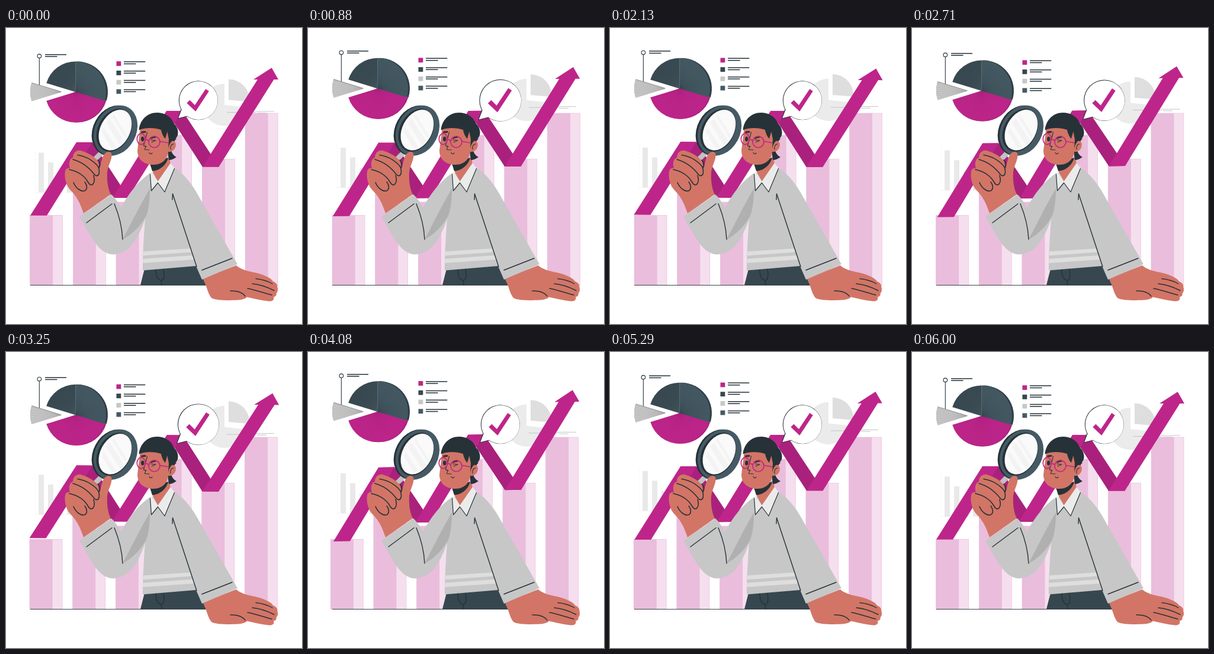
Animation, 500 px wide and 500 px high, one loop 6040 ms. Source, as an HTML page:

```html
<!DOCTYPE html>
<html lang="en">
<head>
<meta charset="utf-8">
<title>Growth analysis</title>
<style>
html, body { margin: 0; width: 100%; height: 100%; overflow: hidden; background: #fff; }
svg { display: block; width: 100vw; height: 100vh; }
.pen { fill: none; stroke: #263238; stroke-width: 1.4; stroke-linecap: round; stroke-linejoin: round; }
.skin { fill: #d27566; }
.hair { fill: #263238; }
.knit { fill: #c7c7c7; }
.pink { fill: #be258a; }
.deep { fill: #a9217c; }
</style>
</head>
<body>
<svg viewBox="0 0 500 500">
  <g id="backdrop">
    <path fill="#ebebeb" d="M369 94V130L404.500 134A35.700 35.700 0 1 1 369 94Z"/>
    <path fill="#dedede" d="M376 86.500A35.500 35.500 0 0 1 411.300 124.500L376 121.500Z"/>
    <path fill="none" stroke="#c4c4c4" stroke-width="1" d="M373 142.500H420L424 141H453M424 143.700H440"/>
    <path fill="none" stroke="#e4e4e4" stroke-dasharray="1 4.500" d="M49.500 205V278"/>
    <path fill="none" stroke="#efefef" stroke-width=".7" d="M49 278H112"/>
    <path fill="#e9e9e9" d="M55 210.500h9V278h-9zM71 227h9V278h-9zM87 245h9V278h-9zM103 238h9V278h-9z"/>
  </g>
  <g id="bars"></g>
  <path stroke="#263238" stroke-width=".9" d="M41 434.500H345"/>
  <g id="arrow">
    <path class="deep" d="M119 193H146L207.500 287H180ZM271 140H298L360 234.500H332Z"/>
    <path class="pink" d="M41 316.700H69L146 193H119ZM180 287H206L298 140H271ZM332 234.500H359.500L452.500 87H460L448.800 67.300L418 87H425Z"/>
  </g>
  <g id="pie">
    <path class="pen" style="stroke-width:1.100" d="M56.300 51V97"/>
    <circle class="pen" cx="56.300" cy="47.400" r="3.300" style="stroke-width:1.100"/>
    <path fill="none" stroke="#263238" stroke-width="1.500" d="M66 44.900H102M66 48.200H86.500"/>
    <g id="slices"></g>
    <g id="legend"></g>
  </g>
  <g id="bubble">
    <path fill="#263238" d="M295.500 137L289.800 153.400L306 149.400Z"/>
    <circle fill="#263238" cx="324.800" cy="122.300" r="33"/>
    <circle fill="#fff" cx="325.200" cy="122.500" r="32.400"/>
    <path fill="#fff" d="M297 137L291.200 152.200L306 148.500L312 135Z"/>
    <path class="pink" d="M305.300 126.800L310.500 121.800L319 130.300L337.300 103L342.800 106.700L320.300 141Z"/>
  </g>
  <g id="man">
    <path fill="#37474f" d="M234 407L322 400L338 434.500H227Z"/>
    <path class="pen" d="M253 408C253 420 257 427 264 426C268 423 267 415 266 407M262 427L263 434"/>

    <path class="skin" d="M333 423L389 401C396 408 410 411 420 413C434 416 448 422 451 428C456 430 459 433 458.500 438C460 442 459 446 456.500 448.500C458 452 454 454 452 454.500C454 459 450 462 444 461.500C431 460 419 457 407 454.500C403 460 389 459.500 378 460C364 460 352 459 347 456C341 449 339 436 333 423Z"/>
    <path class="pen" d="M379 444C390 444 400 447 404 453M422 423.500C432 424.500 443 428 450 432M416 432C429 433 442 438 453 443.500M408 440C421 442 436 448 449 451"/>

    <path class="knit" d="M124 319L178 281C186 289 191 297 194 304C205 283 223 258 244 245L284 236C298 244 311 259 322 278L391 399L331 425L321 402L231 409.500C231 388 232 362 235 322C229 341 218 364 205 374C196 380 188 382.500 179 382.500C155 380 143 350 124 319Z"/>
    <path fill="#b0b0b0" d="M243 271C243 287 242 303 237 317C227 335 213 349 197 357C211 331 227 298 243 271Z"/>
    <path fill="#dedede" d="M232 377.500L311 372.500L315 378.500L232 384.500ZM231.500 390L316 384L319 391L231 397Z"/>
    <path class="pen" d="M136 329L179 297M183 297C190 314 196 334 197 357M281 290L281.500 280L322 403M331 409L382 389"/>

    <path fill="#c2c2c2" d="M159 207L166 212L154 224L147 219Z"/>
    <g transform="rotate(28 183.500 173)">
      <ellipse cx="182.300" cy="174" rx="35" ry="44.500" fill="#263238"/>
      <ellipse cx="185" cy="172.500" rx="34.800" ry="44.500" fill="#455a64"/>
      <ellipse cx="182.700" cy="173" rx="27.500" ry="38.500" fill="#263238"/>
      <ellipse cx="184" cy="172" rx="25" ry="36.500" fill="#fafafa"/>
    </g>
    <path fill="#f3f3f3" d="M169 160L175 153L200 191L193 198ZM179 149L182 146L204 181L202 186ZM162 176L165 168L186 201L179 204Z"/>
    <path class="skin" d="M131 313C125 296 121 286 108 273C99 262 98 245 101 239C103 237 106 236 108 237C105 228 108 220 113 219C113 211 119 206 126 207C140 211 151 218 156 226L158 238C160 228 163 219 164 216C168 209 176 206 178.500 213C179 223 173 231 171 243C170 261 173 273 177 281Z"/>
    <path class="pen" style="stroke-width:1.600" d="M121 214.500C138 217 151 227 157 236C160 231 158 226 155 223M113 222C131 227 142 238 149 247C155 254 160 246 156 235M107 239C125 243 134 252 139 261C144 270 152 263 148 249M114 261C118 271 127 277 133 275C138 272 137 265 133 260"/>

    <path class="skin" d="M245 230L276 219L278 230L257 260L247 241Z"/>
    <path class="hair" d="M243 229L274 219C271 231 260 241 247 241.500Z"/>
    <path fill="#ebebeb" d="M246 243L256.500 259L278 228L285 237L268 277L256.500 261L246 275L243.500 247Z"/>
    <path class="pen" style="stroke-width:1.200" d="M243.500 247L245.500 275L256.500 261.500L268 277L284.500 237.500"/>

    <path class="hair" d="M270 180L288 187C282 193 280 200 279 206C280 212 284 216 288 218C284 221 279 223 275 223L273 207Z"/>
    <path class="skin" d="M227 166L276 166L278 192C285 188 289 195 286 202C284 207 279 210 274 209C273 220 265 231 249 231C233 231 222 222 222 207Z"/>
    <path class="hair" d="M224.500 172.500C226 156 238 143 255 143C268 143 280 150 283 161C289 165 292 175 290 181C288 187 284 188 281 190C277 194 275 198 274 205L275 188L272.500 175L269 187C266 184 263 178 262 172C252 169 238 167 224.500 172.500Z"/>
    <path class="pen" style="stroke-width:1.100" d="M283 196C279 196 277 201 278 205M242 210.500C243 213 246 213.500 247 211M238.500 176L232.500 199L237 200.500M236 199L234.500 205.500L242 206M245 189L253 190L246 193"/>
    <path class="pen" style="stroke-width:3" d="M229.500 176L235 175.500M245 186C248 184 250 184 252 184"/>
    <ellipse class="hair" cx="230.700" cy="187.500" rx="2.700" ry="4"/>
    <g fill="none" stroke="#be258a" stroke-width="1.700">
      <ellipse cx="228.300" cy="187.500" rx="7" ry="9.300"/>
      <circle cx="250.500" cy="192.500" r="9.500"/>
      <path d="M235 189Q238 187 241 191M260 191.500L274 194"/>
    </g>
  </g>
</svg>
<script>
const LOOP = 6040;
const byId = id => document.getElementById(id);

function add(parent, tag, attrs) {
  const node = document.createElementNS('http://www.w3.org/2000/svg', tag);
  for (const key in attrs) node.setAttribute(key, attrs[key]);
  parent.appendChild(node);
  return node;
}

// Bar chart: a front face and a paler side face
[316.5, 245, 294, 181, 221.5, 144].forEach((top, i) => {
  const x = 40.6 + 72.7 * i;
  const face = (left, width, fill) => add(byId('bars'), 'rect', {
    x: left, y: top, width, height: 434.3 - top, fill, stroke: '#e8b5d8', 'stroke-width': 0.6
  });
  face(x, 55, '#f5dfee');
  face(x, 38.6, '#eabddc').setAttribute('stroke', 'none');
});

// Pie wedges with radial hatching, angles in degrees clockwise from the right
function wedge(cx, cy, r, from, to, fill) {
  const at = deg => {
    const a = deg * Math.PI / 180;
    return `${cx + r * Math.cos(a)} ${cy + r * Math.sin(a)}`;
  };
  const large = to - from > 180 ? 1 : 0;
  add(byId('slices'), 'path', { d: `M${cx} ${cy}L${at(from)}A${r} ${r} 0 ${large} 1 ${at(to)}Z`, fill });
  return at;
}
function slice(cx, cy, r, from, to, fill, hatch) {
  const at = wedge(cx, cy, r, from, to, fill);
  let d = '';
  for (let deg = from; deg <= to; deg += 4) d += `M${cx} ${cy}L${at(deg)}`;
  add(byId('slices'), 'path', { d, stroke: hatch, 'stroke-width': 0.45, opacity: 0.5 });
}
wedge(120.5, 108, 51.5, -90, 17, '#2f3e46');
wedge(120, 108, 51.5, 17, 163, '#a9217c');
slice(117.5, 108, 51.5, 17, 163, '#be258a', '#981d70');
slice(117.5, 108, 51.5, -90, 17, '#455a64', '#263238');
slice(117.5, 108, 51.5, -163, -90, '#37474f', '#56686f');
wedge(94.5, 107.6, 53.5, 163, 197, '#929292');
slice(93, 108.3, 52, 163, 197, '#c7c7c7', '#858585');

['#be258a', '#37474f', '#c7c7c7', '#455a64'].forEach((fill, i) => {
  const y = 60.3 + 15.7 * i;
  add(byId('legend'), 'rect', { x: 186.5, y: y - 4, width: 7.8, height: 7.8, fill });
  add(byId('legend'), 'path', {
    d: `M199 ${y - 3.2}H235.3M199 ${y + 0.2}H219.5`, stroke: '#263238', 'stroke-width': 1.5
  });
});

// Linear keyframes: [progress, value] pairs
function track(keys, t, period) {
  const p = t % period / period;
  const i = keys.findIndex(key => key[0] > p);
  const [p0, v0] = keys[i - 1], [p1, v1] = keys[i];
  return v0 + (v1 - v0) * (p - p0) / (p1 - p0);
}
const FLOAT = [[0, 0], [0.5, -10], [1, 0]];
const SWAY = [[0, 0], [0.25, 1], [0.75, -1], [1, 0]];
const BEAT = [[0, 1], [0.1, 1.1], [0.3, 1], [0.4, 1], [0.5, 1.1], [0.6, 1], [1, 1]];
const SHAKE = [0, -1, 2, -4, 4, -4, 4, -4, 2, -1, 0].map((x, i) => [i / 10, x]);

function draw(t) {
  const move = (id, value) => byId(id).setAttribute('transform', value);
  move('backdrop', `translate(0 ${track(FLOAT, t, 1500)})`);
  move('pie', `translate(0 ${track(FLOAT, t, 3000)})`);
  move('bars', `translate(${track(SHAKE, t, 6000)} 0)`);
  move('arrow', `rotate(${track(SWAY, t, 1500)} 250.5 192)`);
  move('bubble', `translate(324 122.3) scale(${track(BEAT, t, 6000)}) translate(-324 -122.3)`);
}

const start = performance.now();
function tick() {
  draw((performance.now() - start) % LOOP);
  requestAnimationFrame(tick);
}
tick();
</script>
</body>
</html>
```
